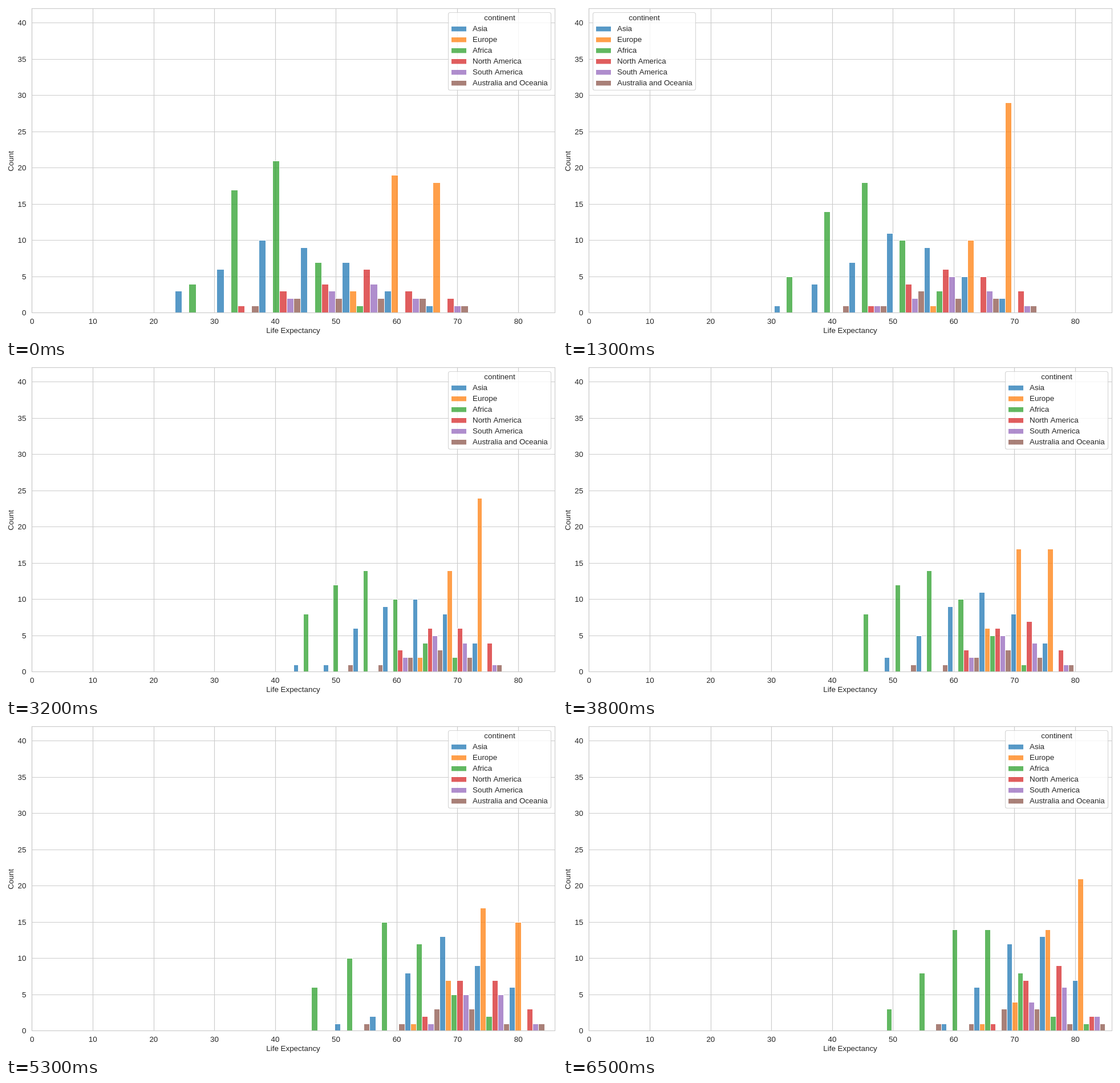
Write an HTML page with a canvas that moves like this. It is 966 px wide and 580 px high and loops after 6.6 s.

```html
<!DOCTYPE html>
<html lang="en">
<head>
<meta charset="utf-8">
<title>Life expectancy by continent</title>
<style>
html, body { margin: 0; width: 100%; height: 100%; overflow: hidden; background: #fff; }
canvas { display: block; width: 966px; height: 580px; }
</style>
</head>
<body>
<canvas id="chart" width="966" height="580"></canvas>
<script>
const ctx = document.getElementById('chart').getContext('2d');
const STEP = 100, STEPS = 66, BINS = 7;
const LEFT = 45, RIGHT = 962, TOP = 4, BASE = 537;
const GRID = '#cccccc', INK = '#262626';

// Each continent is a bell curve over the bins: its centre and spread drift with time.
const CENTRE_STEPS = [0, 18, 28, 45, 65];
const SPREAD_STEPS = [0, 32, 65];
const groups = [
  { name: 'Asia', rgb: '31,119,180', size: 39,
    centre: [3.09, 3.95, 4.16, 4.45, 5.01], spread: [1.5, 1.45, 1.12] },
  { name: 'Europe', rgb: '255,127,14', size: 40,
    centre: [5.92, 6.6, 6.45, 5.46, 6.08], spread: [0.62, 0.77, 0.93] },
  { name: 'Africa', rgb: '44,160,44', size: 50,
    centre: [2.18, 2.4, 2.4, 2.3, 3.02], spread: [0.82, 1.4, 1.3] },
  { name: 'North America', rgb: '214,39,40', size: 19,
    centre: [4.18, 5, 5.15, 5.05, 5.15], spread: [1.35, 1.05, 0.72] },
  { name: 'South America', rgb: '148,103,189', size: 12,
    centre: [4.25, 4.75, 4.85, 4.92, 5.25], spread: [1.15, 0.9, 0.72] },
  { name: 'Australia and Oceania', rgb: '140,86,75', size: 10,
    centre: [3.9, 4.2, 4.4, 4.1, 4], spread: [1.7, 1.5, 1.3] }
];

// Left and right end of the bins in pixels.
const RANGE_STEPS = [0, 13, 22, 32, 45, 53, 65];
const LOW = [296, 369.5, 430.2, 503.7, 512.6, 515, 547.5];
const HIGH = [809.5, 829.8, 842, 869.2, 926, 943.5, 950.3];

// Steps where one country falls far behind and stretches the bins.
const dips = {
  35: { low: 422, group: 2 },
  44: { low: 187, group: 2 },
  49: { low: 447, group: 2 },
  60: { low: 390, group: 3 }
};

const xAt = years => 45.45 + years * 10.656;
const yAt = count => 537.4 - count * 12.7;
const tint = g => `rgba(${groups[g].rgb},0.75)`;

function curve(steps, values, step) {
  let i = 0;
  while (i < steps.length - 2 && steps[i + 1] <= step) i++;
  const t = (step - steps[i]) / (steps[i + 1] - steps[i]);
  return values[i] + (values[i + 1] - values[i]) * t;
}

// Share of a normal distribution below z.
const share = z => 1 / (1 + Math.exp(-1.596 * z - 0.0707 * z ** 3));

function histogram(step) {
  const dip = dips[step];
  const base = curve(RANGE_STEPS, LOW, step);
  const high = curve(RANGE_STEPS, HIGH, step);
  const low = dip ? dip.low : base;
  const unit = (high - base) / BINS;
  const width = (high - low) / BINS;
  const counts = groups.map((group, g) => {
    const centre = curve(CENTRE_STEPS, group.centre, step);
    const spread = curve(SPREAD_STEPS, group.spread, step);
    const fallen = dip && dip.group === g ? 1 : 0;
    const size = group.size - fallen;
    const row = [];
    let done = 0;
    for (let n = 1; n <= BINS; n++) {
      const z = ((low + n * width - base) / unit - centre) / spread;
      const total = n === BINS ? size : Math.round(size * share(z));
      row.push(total - done);
      done = total;
    }
    row[0] += fallen;
    return row;
  });
  return { low, width, counts };
}

function text(str, x, y, align) {
  ctx.fillStyle = INK;
  ctx.textAlign = align;
  ctx.fillText(str, x, y);
}

function line(x0, y0, x1, y1) {
  ctx.beginPath();
  ctx.moveTo(x0, y0);
  ctx.lineTo(x1, y1);
  ctx.stroke();
}

function drawGrid() {
  ctx.strokeStyle = GRID;
  ctx.lineWidth = 1.2;
  for (let v = 0; v <= 80; v += 10) {
    const x = Math.round(xAt(v)) + 0.5;
    line(x, TOP, x, BASE);
  }
  for (let v = 0; v <= 40; v += 5) {
    const y = Math.round(yAt(v)) + 0.5;
    line(LEFT, y, RIGHT, y);
  }
}

function drawBars({ low, width, counts }) {
  const bar = width / groups.length;
  ctx.strokeStyle = '#fff';
  ctx.lineWidth = 1;
  counts.forEach((row, g) => row.forEach((count, n) => {
    if (!count) return;
    const x = low + n * width + g * bar;
    const l = Math.round(x), r = Math.round(x + bar), t = Math.round(yAt(count));
    ctx.fillStyle = tint(g);
    ctx.fillRect(l, t, r - l, BASE - t);
    ctx.strokeRect(l + 0.5, t + 0.5, r - l, BASE - t);
  }));
}

function drawAxes() {
  ctx.strokeStyle = GRID;
  ctx.lineWidth = 1.2;
  ctx.strokeRect(LEFT + 0.5, TOP + 0.5, RIGHT - LEFT, BASE - TOP);
  for (let v = 0; v <= 80; v += 10) text(v, xAt(v) + 0.3, 557, 'center');
  for (let v = 0; v <= 40; v += 5) text(v, 35.5, Math.round(yAt(v) + 4.7), 'right');
  text('Life Expectancy', 503.5, 573, 'center');
  ctx.save();
  ctx.translate(13, 272);
  ctx.rotate(-Math.PI / 2);
  text('Count', 0, 0, 'center');
  ctx.restore();
}

function drawLegend(x) {
  ctx.beginPath();
  ctx.roundRect(x + 0.5, 11.5, 180, 136, 3);
  ctx.fillStyle = 'rgba(255,255,255,0.8)';
  ctx.fill();
  ctx.strokeStyle = 'rgba(204,204,204,0.8)';
  ctx.lineWidth = 1.2;
  ctx.stroke();
  text('continent', x + 90.5, 25, 'center');
  groups.forEach(({ name }, g) => {
    const y = Math.round(40 + g * 19.08);
    ctx.fillStyle = tint(g);
    ctx.fillRect(x + 6, y - 4, 26, 8.4);
    text(name, x + 43, y + 4, 'left');
  });
}

function draw(step) {
  const hist = histogram(step);
  const tall = hist.counts.some(row => row.some(count => count > 26));
  ctx.fillStyle = '#fff';
  ctx.fillRect(0, 0, 966, 580);
  ctx.font = '13.4px "Liberation Sans", Arial, sans-serif';
  drawGrid();
  drawBars(hist);
  drawAxes();
  drawLegend(tall ? 52 : 775);
}

const start = performance.now();
function tick() {
  draw(Math.floor((performance.now() - start) / STEP) % STEPS);
  requestAnimationFrame(tick);
}
tick();
</script>
</body>
</html>
```
